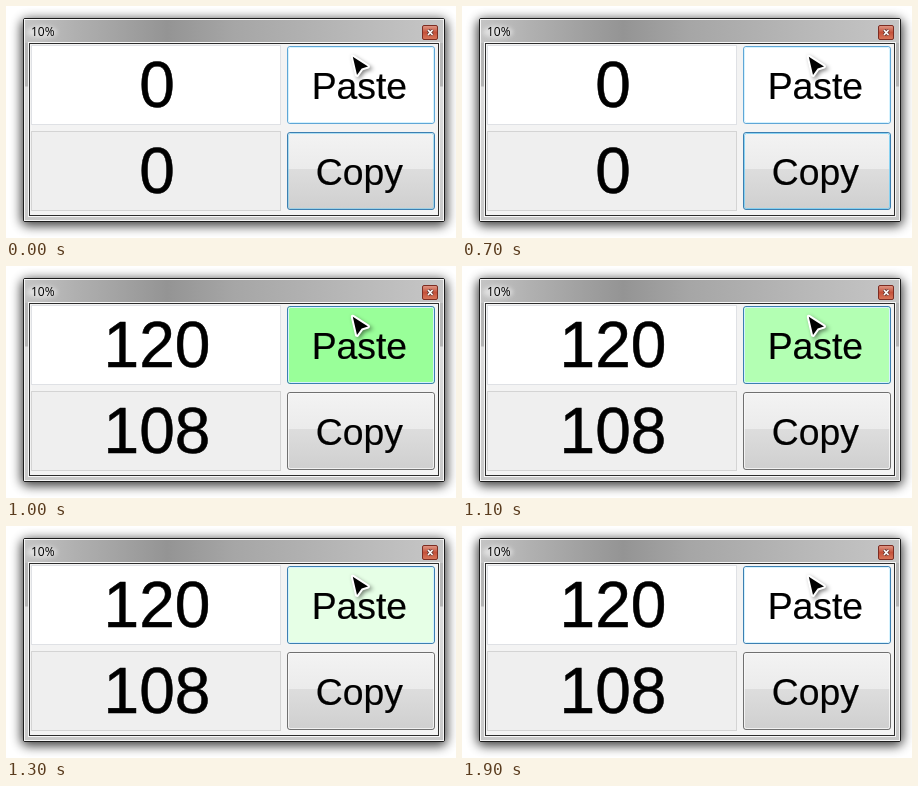
These frames come from a looping animation (450x232 px, 2 s). An HTML page:

```html
<!DOCTYPE html>
<html lang="en">
<head>
<meta charset="utf-8">
<style>
  html, body { margin: 0; width: 100%; height: 100%; overflow: hidden; background: #fff; }
  svg { display: block; }
  text { font-family: "Liberation Sans", Arial, sans-serif; text-anchor: middle; }
  .num { font-size: 64px; stroke: #000; stroke-width: .5; }
  .label { font-size: 37.33px; stroke: #000; stroke-width: .2; }
  .title { font: 12px "Open Sans", "Noto Sans", sans-serif; text-anchor: start; }
</style>
</head>
<body>
<svg width="450" height="232" viewBox="0 0 450 232">
  <defs>
    <filter id="blur" x="-10%" y="-15%" width="120%" height="130%"><feGaussianBlur stdDeviation="5.5"/></filter>
    <filter id="soft" x="-50%" y="-80%" width="200%" height="260%"><feGaussianBlur stdDeviation="2"/></filter>
    <linearGradient id="bar">
      <stop offset="0" stop-color="#c4c4c4"/>
      <stop offset=".12" stop-color="#b0b0b0"/>
      <stop offset=".34" stop-color="#949494"/>
      <stop offset=".5" stop-color="#a6a6a6"/>
      <stop offset="1" stop-color="#c6c6c6"/>
    </linearGradient>
    <linearGradient id="side" x2="0" y2="1">
      <stop offset="0" stop-color="#b8b8b8"/>
      <stop offset=".33" stop-color="#b4b4b4"/>
      <stop offset=".34" stop-color="#dedede"/>
      <stop offset="1" stop-color="#c8c8c8"/>
    </linearGradient>
    <linearGradient id="gray" x2="0" y2="1">
      <stop offset="0" stop-color="#f3f3f3"/>
      <stop offset=".48" stop-color="#ebebeb"/>
      <stop offset=".48" stop-color="#dddddd"/>
      <stop offset="1" stop-color="#cfcfcf"/>
    </linearGradient>
    <linearGradient id="red" x2="0" y2="1">
      <stop offset="0" stop-color="#e09a88"/>
      <stop offset=".5" stop-color="#c4513a"/>
      <stop offset="1" stop-color="#d8785c"/>
    </linearGradient>
    <path id="arrow" d="M346.8 50.8L362 60.5L355.7 62.5L351 69Z"/>
  </defs>

  <rect x="15" y="13" width="426" height="207" rx="7" opacity=".75" filter="url(#blur)"/>
  <rect x="17.5" y="12.5" width="421" height="203" rx="1.5" fill="url(#side)" stroke="#1c1c1c"/>
  <rect x="19" y="14" width="418" height="23" fill="url(#bar)"/>
  <g fill="none" stroke="#f6f6f6">
    <rect x="18.5" y="13.5" width="419" height="201"/>
    <rect x="22.5" y="36.5" width="411" height="174"/>
  </g>
  <ellipse cx="36" cy="26" rx="15" ry="6" fill="#fff" opacity=".5" filter="url(#soft)"/>
  <text class="title" x="25" y="30">10%</text>
  <rect x="416.5" y="19.5" width="15" height="14" rx="1.5" fill="url(#red)" stroke="#7c2c22"/>
  <g fill="none">
    <path id="cross" d="M422 24l4.5 5m0-5l-4.5 5" stroke="#6b3a34" stroke-width="3"/>
    <use href="#cross"/>
    <path d="M422 24l4.5 5m0-5l-4.5 5" stroke="#fff" stroke-width="1.6"/>
  </g>

  <rect x="23.5" y="37.5" width="409" height="172" fill="#f3f3f3" stroke="#2c2c2c"/>
  <rect x="25.5" y="39.5" width="249" height="79" fill="#fff" stroke="#dfe1e5"/>
  <rect x="25.5" y="125.5" width="249" height="79" fill="#efefef" stroke="#d4d4d4"/>
  <text class="num" id="top" x="151" y="101"></text>
  <text class="num" id="bottom" x="151" y="187"></text>

  <rect id="paste" x="281.5" y="40.5" width="147" height="77" rx="2.5"/>
  <rect x="282.5" y="41.5" width="145" height="75" rx="2" fill="none" stroke="#d4f2fe"/>
  <text class="label" x="353.4" y="93">Paste</text>

  <rect id="copy" x="281.5" y="126.5" width="147" height="77" rx="2.5" fill="url(#gray)"/>
  <rect id="glow" x="282.5" y="127.5" width="145" height="75" rx="2" fill="none"/>
  <text class="label" x="353.4" y="179">Copy</text>

  <use href="#arrow" x="2" y="2" stroke="#000" stroke-width="3" opacity=".5" filter="url(#soft)"/>
  <use href="#arrow" stroke="#fff" stroke-width="4" stroke-linejoin="round" paint-order="stroke"/>
</svg>
<script>
  const start = performance.now();
  const $ = id => document.getElementById(id);
  const set = (id, attrs) => {
    for (const k in attrs) $(id).setAttribute(k, attrs[k]);
  };

  function draw() {
    const t = Math.floor((performance.now() - start) % 2000 / 100) * 100;
    const pasted = t >= 800;
    $("top").textContent = pasted ? 120 : 0;
    $("bottom").textContent = pasted ? 108 : 0;

    // The green flash fades to white in equal steps.
    const tint = pasted ? Math.min(255, Math.round(128 + (t - 900) * 0.254)) : 255;
    set("paste", {
      fill: `rgb(${tint},255,${tint})`,
      stroke: pasted ? "#3c7fb1" : "#5fa6d6"
    });

    // The default button's blue edge brightens until focus moves away.
    set("copy", { stroke: pasted ? "#707070" : "#3c7fb1" });
    set("glow", {
      stroke: pasted ? "#fafafa" : "#7fd0f2",
      opacity: pasted ? 0.8 : 0.6 + 0.3 * t / 700
    });
    requestAnimationFrame(draw);
  }
  draw();
</script>
</body>
</html>
```
